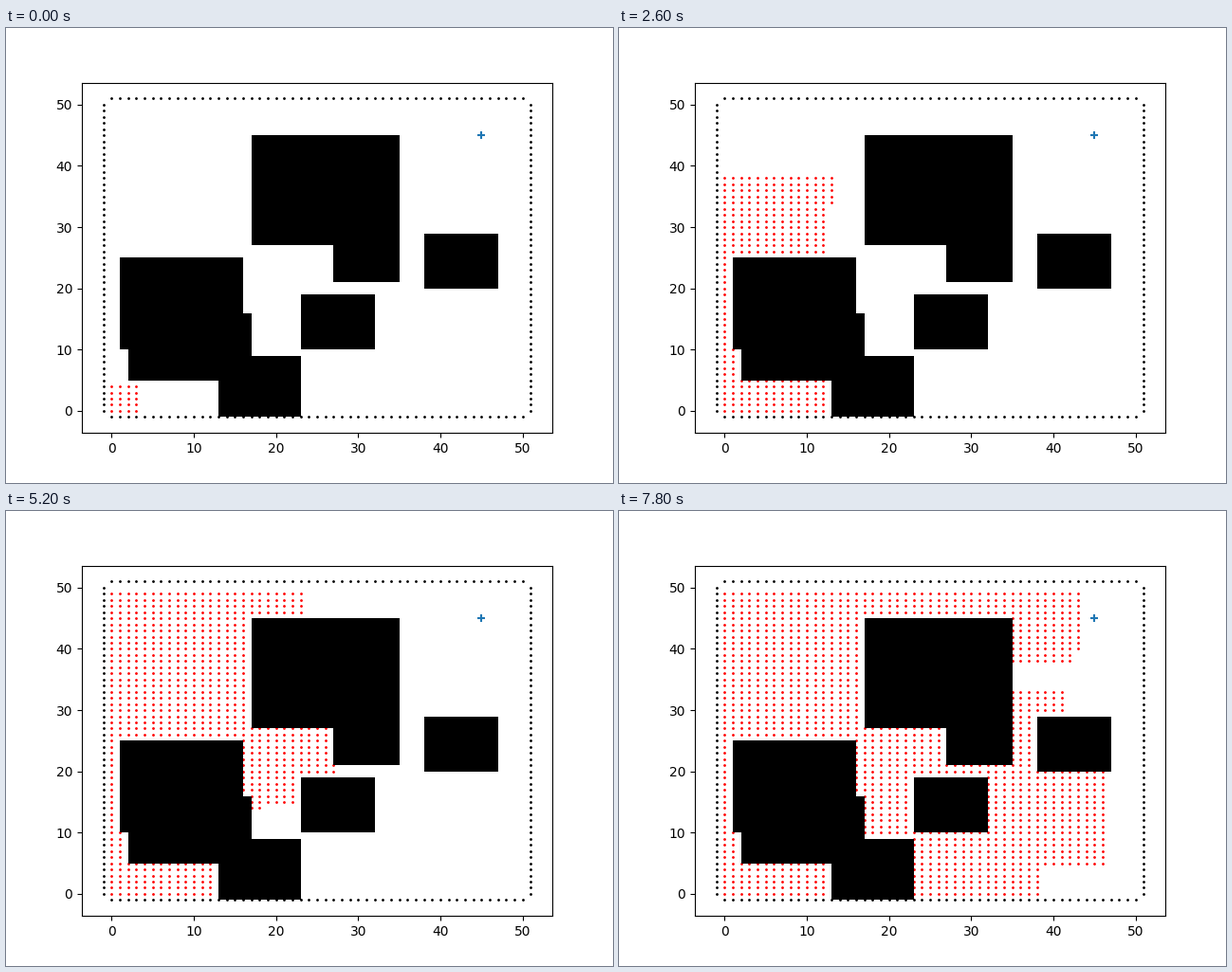
Write a matplotlib script that moves like this. It is 640x480 px and loops after 8000 ms.

```python
import numpy as np
import matplotlib.pyplot as plt
from matplotlib.animation import FuncAnimation
from matplotlib.patches import Rectangle

SIZE = 50
FRAMES, INTERVAL = 40, 200
START, GOAL = (0, 0), (45, 45)

# square obstacles: left, top, side
OBSTACLES = [(17, 45, 18), (27, 29, 8), (38, 29, 9), (23, 19, 9),
             (13, 9, 10), (1, 25, 15), (6, 16, 11), (2, 15, 10)]

# neighbours row by row, from upper left to lower right
STEPS = [(dx, dy) for dy in (1, 0, -1) for dx in (-1, 0, 1) if dx or dy]


def is_free(x, y):
    inside = 0 <= x < SIZE and 0 <= y < SIZE
    return inside and not any(
        left <= x < left + side and top - side < y <= top
        for left, top, side in OBSTACLES)


def breadth_first(start):
    """Cells in the order in which the search discovers them."""
    order, seen = [start], {start}
    for x, y in order:
        for dx, dy in STEPS:
            cell = (x + dx, y + dy)
            if cell not in seen and is_free(*cell):
                seen.add(cell)
                order.append(cell)
    return np.array(order)


def visited_count(i):
    """The search speeds up as its front widens."""
    return int(np.interp(i, [0, 6, 18, 26, 35, 39],
                         [20, 100, 404, 662, 1072, 1280]))


def draw_border(ax):
    run = np.arange(SIZE + 1)
    for edge in (-1, SIZE + 1):
        side = np.full_like(run, edge)
        ax.scatter(run, side, s=1, c="black", zorder=0.8)
        ax.scatter(side, run, s=1, c="black", zorder=0.8)


plt.rcParams["text.kerning_factor"] = 6
fig, ax = plt.subplots(figsize=(6.4, 4.8), dpi=100)
draw_border(ax)
ax.scatter(*GOAL, marker="+", zorder=0.8)
visited = ax.scatter(*START, s=1, c="red", zorder=0.9)
for left, top, side in OBSTACLES:
    ax.add_patch(Rectangle((left, top - side), side, side,
                           facecolor="black", linewidth=0))

cells = breadth_first(START)


def update(i):
    visited.set_offsets(cells[:visited_count(i)])
    return visited,


anim = FuncAnimation(fig, update, frames=FRAMES, interval=INTERVAL,
                     repeat=True, repeat_delay=0)
plt.show()
```
